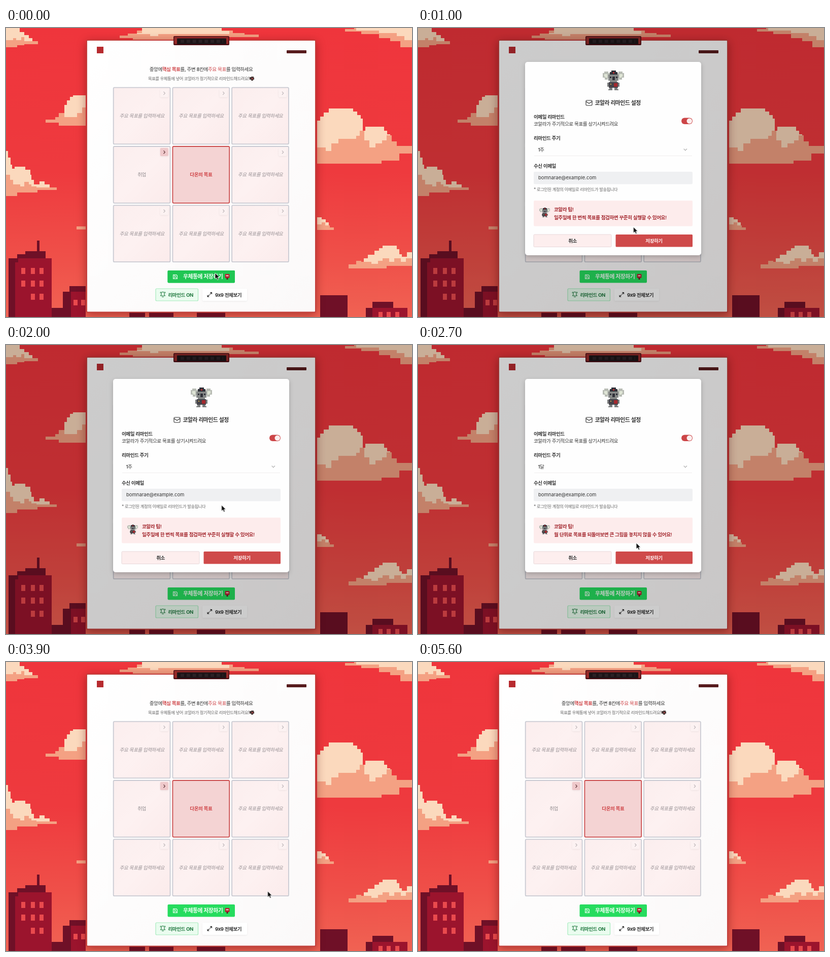
Write an HTML page that moves like this. It is 800 px wide and 571 px high and loops after 5700 ms.

```html
<!DOCTYPE html>
<html lang="ko">
<head>
<meta charset="utf-8">
<title>목표 리마인드</title>
<style>
html, body { margin: 0; width: 100%; height: 100%; overflow: hidden; background: #ee383d; }
svg { display: block; }
#stage { width: 100vw; height: 100vh; }
text { font: 500 9.6px Inter, "Noto Sans CJK KR", "Noto Sans CJK", sans-serif; letter-spacing: -.05em; word-spacing: .04em; fill: #333; }
.mid { text-anchor: middle; }
.small { font-size: 8.25px; fill: #666; }
.bold { font-weight: 700; }
.big { font-size: 10.9px; }
.hint { font-style: italic; fill: #989195; }
.red { fill: #cf4447; }
.tip { fill: #a3262d; font-weight: 600; }
.mail { font-size: 9.5px; font-weight: 400; letter-spacing: 0; }
.pixel { shape-rendering: crispEdges; }
.cream { fill: #fbd9bd; }
.salmon { fill: #f4a183; }
.wall { fill: #9b142d; }
.dark { fill: #6f1027; }
.window { fill: #e94a4d; }
.line { fill: none; stroke-width: 1.1; stroke-linecap: round; stroke-linejoin: round; }
.card { filter: drop-shadow(0 4px 9px #5a080877); }
.soft { filter: drop-shadow(0 1px 1.5px #0001); }

.anim { animation: 5.7s linear infinite; }
#shade { animation-name: shade; }
#modal { animation-name: modal; transform-origin: 384.5px 258px; }
#press { animation-name: press; }
#hover { animation-name: hover; }
#cursor { animation-name: move; }
#arrow, #hand, .before, .after { animation-timing-function: step-end; }
#arrow { animation-name: arrow; }
#hand { animation-name: hand; }
.before { animation-name: before; }
.after { animation-name: after; }

@keyframes shade {
  0%, 1.75%, 56.14%, 100% { opacity: 0; }
  5.26%, 52.63% { opacity: 1; }
}
@keyframes modal {
  0%, 1.75%, 56.14%, 100% { opacity: 0; transform: scale(.95); }
  5.26%, 52.63% { opacity: 1; transform: none; }
}
@keyframes press {
  0%, 14.04% { opacity: 1; }
  16.7%, 100% { opacity: 0; }
}
@keyframes hover {
  0%, 54.4%, 67.5%, 100% { opacity: 0; }
  57%, 65% { opacity: 1; }
}
@keyframes move {
  0% { transform: translate(412px, 484px); }
  7.02%, 12.3% { transform: translate(410px, 483px); animation-timing-function: ease-in-out; }
  24.56%, 28% { transform: translate(448px, 246px); animation-timing-function: ease-in-out; }
  36%, 40% { transform: translate(424px, 318px); animation-timing-function: ease-in-out; }
  47.37% { transform: translate(430px, 391px); }
  51%, 65% { transform: translate(434px, 416px); animation-timing-function: ease-in; }
  73.68%, 100% { transform: translate(820px, 590px); }
}
@keyframes arrow {
  0%, 66.5% { opacity: 1; }
  55% { opacity: 0; }
  75%, 100% { opacity: 0; }
}
@keyframes hand {
  0%, 66.5%, 100% { opacity: 0; }
  55% { opacity: 1; }
}
@keyframes before { 0% { opacity: 1; } 38.6%, 100% { opacity: 0; } }
@keyframes after { 0% { opacity: 0; } 38.6%, 100% { opacity: 1; } }
</style>
</head>
<body>
<svg id="stage" viewBox="0 0 800 571" preserveAspectRatio="none">
  <defs>
    <linearGradient id="sky" x2="0" y2="1">
      <stop stop-color="#ef353c"/><stop offset=".5" stop-color="#ee3a3e"/>
      <stop offset=".8" stop-color="#ef5049"/><stop offset="1" stop-color="#f06253"/>
    </linearGradient>
    <linearGradient id="paper" x2="1" y2="1">
      <stop stop-color="#fff"/><stop offset="1" stop-color="#fbf9f9"/>
    </linearGradient>
    <linearGradient id="cell" x2="1" y2="1">
      <stop stop-color="#fbeeee"/><stop offset=".5" stop-color="#fdf1f1"/><stop offset="1" stop-color="#fbebeb"/>
    </linearGradient>
    <symbol id="koala" viewBox="0 0 42 40">
      <g class="pixel">
        <path fill="#b9bdb5" d="M0 5H3V2H11V5H14V15H10V18H4V14H0ZM42 5H39V2H31V5H28V15H32V18H38V14H42Z"/>
        <path fill="#dfe5d6" d="M3 7H9V14H5V12H3ZM39 7H33V14H37V12H39Z"/>
        <path fill="#858887" d="M11 8H31V20H28V23H14V20H11Z"/>
        <path fill="#303139" d="M14 3H17V0H26V3H29V8H14ZM19 12H24V19H19ZM14 12H17V15H14ZM26 12H29V15H26Z"/>
        <path fill="#b93033" d="M20 3H23V6H20Z"/>
        <path fill="#45434a" d="M12 23H30V34H12Z"/>
        <path fill="#7b7d7d" d="M9 24H12V32H9ZM30 24H33V32H30ZM13 34H19V39H11V37H13ZM23 34H29V37H31V39H23Z"/>
        <path fill="#a5292e" d="M22 25H29V32H22Z"/>
        <path fill="#c9a54c" d="M15 26H17V28H15Z"/>
      </g>
    </symbol>
  </defs>

  <rect width="800" height="571" fill="url(#sky)"/>

  <g class="pixel">
    <path class="cream" d="M0 0H27V8H36V14H45V20H52V28H0Z"/>
    <path class="salmon" d="M0 24H14V20H20V24H30V18H36V26H63V32H36V34H22V38H0Z"/>
    <path class="salmon" d="M224 15H240V11H258V5H275V0H425V5H447V10H470V13H498V18H440V24H250V20H224Z"/>
    <path class="cream" d="M258 10H268V0H425V6H440V12H300V16H284V12H258Z"/>
    <path class="salmon" d="M668 2H686V0H800V38H777V26H757V20H735V12H700V7H668Z"/>
    <path class="cream" d="M690 0H800V24H785V16H770V10H735V5H690Z"/>
    <path class="cream" d="M115 182V152H120V143H126V136H132V133H157V182Z"/>
    <path class="salmon" d="M78 181H97V176H104V168H115V176H140V168H150V157H157V193H104V187H78Z"/>
    <path class="cream" d="M0 243H4V256H9V270H12V278H17V274H38V280H48V290H50V300H55V309H66V303H76V309H86V318H0Z"/>
    <path class="salmon" d="M0 290H8V300H14V309H28V313H36V304H45V309H50V313H60V315H100V320H62V325H22V332H0Z"/>
    <path class="salmon" d="M139 392H157V398H139Z"/>
    <path class="cream" d="M613 245V183H619V175H626V167H636V159H684V165H692V172H699V179H703V203H708V195H745V203H751V210H757V245Z"/>
    <path class="salmon" d="M613 268V236H630V243H641V228H655V219H690V213H697V203H706V222H716V236H728V228H741V222H750V212H760V224H770V233H800V248H775V262H740V268Z"/>
    <path class="cream" d="M613 374H622V378H630V384H636V392H613Z"/>
    <path class="salmon" d="M613 388H622V384H629V390H638V394H646V399H613Z"/>
    <path class="cream" d="M705 467V455H713V448H726V440H735V435H742V430H770V437H775V447H780V452H790V443H800V467Z"/>
    <path class="salmon" d="M675 467H690V460H700V462H720V466H733V460H742V455H755V462H765V455H778V462H788V455H800V470H750V475H675Z"/>

    <path class="dark" d="M5 571V455H22V447H38V441H61V420H66V441H78V455H90V571Z"/>
    <path class="wall" d="M18 571V463H24V455H90V571Z"/>
    <path class="dark" d="M90 571V553H112V521H125V510H157V571Z"/>
    <path class="wall" d="M128 571V521H157V571Z"/>
    <path class="dark" d="M243 562H274V571H243ZM282 562H330V571H282ZM376 562H432V571H376Z"/>
    <path class="dark" d="M619 571V528H673V571ZM709 571V553H722V541H763V553H791V571Z"/>
    <path class="wall" d="M722 571V553H791V571Z"/>
    <g id="windows" class="window"></g>
  </g>

  <rect class="card" x="159" y="24" width="451" height="537.5" rx="2" fill="url(#paper)" stroke="#c4403d" stroke-width="2"/>
  <rect x="330" y="16" width="110" height="18" rx="2" fill="#4d1016"/>
  <rect x="331.5" y="17.5" width="107" height="14" rx="1" fill="#962a29"/>
  <rect x="337" y="20.5" width="97" height="11.5" rx="1" fill="#1c1417"/>
  <path d="M344 26.3H428" stroke="#2b2125" stroke-width="6" stroke-dasharray="7 4.8"/>
  <rect x="179" y="37" width="13" height="13" fill="#b72b2f"/>
  <rect x="553" y="44" width="39" height="6" rx="1" fill="#571b1d"/>

  <text class="mid" x="384.5" y="84.5">중앙에<tspan class="red bold">핵심 목표</tspan>를, 주변 8칸에<tspan class="red">주요 목표</tspan>를 입력하세요</text>
  <text class="small" x="280" y="103">목표를 우체통에 넣어 코알라가 정기적으로 리마인드해드려요!</text>
  <path class="pixel" fill="#4b3b3a" d="M480 97H483V96H488V98H489V102H487V104H483V102H480Z"/>
  <path class="pixel" fill="#a3383a" d="M484 99H487V101H484Z"/>

  <g id="cells"></g>

  <rect x="318.5" y="479" width="132.5" height="24.5" rx="2" fill="#26dc5e"/>
  <rect id="press" class="anim" x="318.5" y="479" width="132.5" height="24.5" rx="2" fill="#20c653"/>
  <path class="line" stroke="#e9ffef" d="M329.5 487.5H335.5L337.5 489.5V495.5H329.5ZM331.5 495V492H335.5V495M331.5 488V489.7H334.5"/>
  <text class="big bold" x="349" y="495" style="fill:#f2fff5">우체통에 저장하기</text>
  <path fill="#5c171f" d="M434.5 492H437.5V497H434.5Z"/>
  <rect x="431.5" y="486" width="9" height="8" rx="1.5" fill="#b51f31"/>
  <path fill="#f3d9d5" d="M433.5 488.5H438.5V490.5H433.5Z"/>

  <rect x="295" y="515" width="83.5" height="24" rx="2" fill="#eafcef" stroke="#a5ecbd" stroke-width="1.2"/>
  <path class="line" stroke="#20783f" d="M304.5 529H313.5L312 527V524.5A3 3 0 0 0 306 524.5V527ZM307.5 531.2H310.5M304 523.5L305 521.5M314 523.5L313 521.5"/>
  <text class="bold" x="319.5" y="530.5" style="fill:#20783f">리마인드 ON</text>
  <rect class="soft" x="387" y="515" width="88" height="24" rx="2" fill="#fff"/>
  <path class="line" stroke="#292929" d="M402.5 522.5H405.5V525.5M405.5 522.5L402 526M400 531H397V528M397 531L400.5 527.5"/>
  <text class="bold" x="412" y="530.5">9x9 전체보기</text>

  <rect id="shade" class="anim" width="800" height="571" fill="#000" fill-opacity=".2"/>

  <g id="modal" class="anim">
    <rect x="211" y="67" width="347" height="382" rx="5" fill="#fefefe" style="filter:drop-shadow(0 3px 4px #0003)"/>
    <use href="#koala" x="363" y="84" width="43" height="40"/>
    <rect class="line" x="331" y="143" width="12" height="10" rx="1.5" stroke="#292929"/>
    <path class="line" stroke="#292929" d="M331.5 145.5L337 149L342.5 145.5"/>
    <text class="big bold" x="348.5" y="151.8">코알라 리마인드 설정</text>

    <text class="bold" x="228" y="178.5">이메일 리마인드</text>
    <text x="228" y="193.4">코알라가 주기적으로 목표를 상기시켜드려요</text>
    <rect x="519" y="177.5" width="22" height="12.5" rx="6.25" fill="#cc4547"/>
    <circle cx="534.8" cy="183.8" r="5.3" fill="#fbeeee"/>

    <text class="bold" x="228" y="221">리마인드 주기</text>
    <path d="M229 252.5H540" stroke="#f0eeee"/>
    <text class="anim before" x="236.5" y="243.6">1주</text>
    <text class="anim after" x="236.5" y="243.6">1달</text>
    <path class="line" stroke="#aaa" d="M524 239L526.8 241.8L529.6 239"/>

    <text class="bold" x="228" y="276">수신 이메일</text>
    <rect x="228" y="284" width="313" height="24.5" rx="2" fill="#eff0f2"/>
    <text class="mail" x="237" y="299.4">bomnarae@example.com</text>
    <text class="small" x="228" y="322">* 로그인된 계정의 이메일로 리마인드가 발송됩니다</text>

    <rect x="228" y="341" width="313" height="50.5" rx="2" fill="#fdecec"/>
    <use href="#koala" x="239" y="354" width="21" height="21"/>
    <text class="tip bold" x="268" y="361.6">코알라 팁!</text>
    <text class="tip anim before" x="268" y="377.6">일주일에 한 번씩 목표를 점검하면 꾸준히 실행할 수 있어요!</text>
    <text class="tip anim after" x="268" y="377.6">월 단위로 목표를 되돌아보면 큰 그림을 놓치지 않을 수 있어요!</text>

    <rect x="228" y="408" width="153" height="24.5" rx="1.5" fill="#fdeeee" stroke="#e8d8da"/>
    <text class="mid bold" x="304.5" y="423.8">취소</text>
    <rect x="389.5" y="408" width="151.5" height="24.5" rx="1.5" fill="#cf4a4a"/>
    <text class="mid bold" x="465" y="423.8" style="fill:#fff1f1">저장하기</text>
  </g>

  <g id="cursor" class="anim">
    <path id="arrow" class="anim" fill="#111" stroke="#fff" stroke-width=".8" d="M0 0V12L2.8 9.5L4.7 13.7L6.8 12.7L5 8.7H8.7Z"/>
    <path id="hand" class="anim" fill="#fff" stroke="#222" stroke-linejoin="round" d="M-1 1.5Q0 0 1.3 1.5L2 5.5Q3.5 4.5 4.5 5.8Q6 5 7 6.4Q8.8 6 9 8V11L7.5 14.5H1.5L-2.5 9.5Q-2.3 7.8 0 9Z"/>
  </g>
</svg>

<script>
const put = (id, html) => document.getElementById(id).insertAdjacentHTML('beforeend', html);
const box = (x, y, w, h, rest = '') => `<rect x="${x}" y="${y}" width="${w}" height="${h}" ${rest}/>`;

// Lit windows
for (const y of [474, 499, 525])
  for (const x of [30, 49, 66])
    if (y < 525 || x > 30) put('windows', box(x, y, 8, 12));
for (const x of [133, 148]) put('windows', box(x, 537, 8, 11));
for (const x of [734, 750, 767]) put('windows', box(x, 561, 8, 10));

// Goal grid
const size = 113.6;
const special = {
  3: { label: '취업', cls: '', style: 'fill:#938d90' },
  4: { label: '다온의 목표', cls: 'bold red' },
};

function frame(x, y, fill, stroke) {
  return box(x + .9, y + .9, size - 1.8, size - 1.8, `rx="2" fill="${fill}" stroke="${stroke}" stroke-width="1.8"`);
}

function tab(x, y, fill, stroke) {
  return box(x + 93, y + 4, 16, 16, `class="soft" rx="2" fill="${fill}"`) +
    `<path class="line" stroke="${stroke}" d="M${x + 100} ${y + 9.5}l2.6 2.7l-2.6 2.7"/>`;
}

for (let i = 0; i < 9; i++) {
  const x = 210.8 + i % 3 * 116.7;
  const y = 116.7 + Math.floor(i / 3) * 116.4;
  const { label = '주요 목표를 입력하세요', cls = 'hint', style = '' } = special[i] || {};
  const center = i === 4;
  let html = center ? frame(x, y, '#f4d3d3', '#cb4d4e') : frame(x, y, 'url(#cell)', '#c9cad2');
  if (i === 3) html += tab(x, y, '#efc9cb', '#51282b');
  else if (!center) html += tab(x, y, '#fcf2f2', '#b9b2b5');
  if (i === 7) html += `<g id="hover" class="anim">${frame(x, y, '#fae8e8', '#cf6768')}${tab(x, y, '#f3dcdd', '#9d8d90')}</g>`;
  html += `<text class="mid ${cls}" style="${style}" x="${x + size / 2}" y="${y + 60}">${label}</text>`;
  put('cells', html);
}
</script>
</body>
</html>
```
